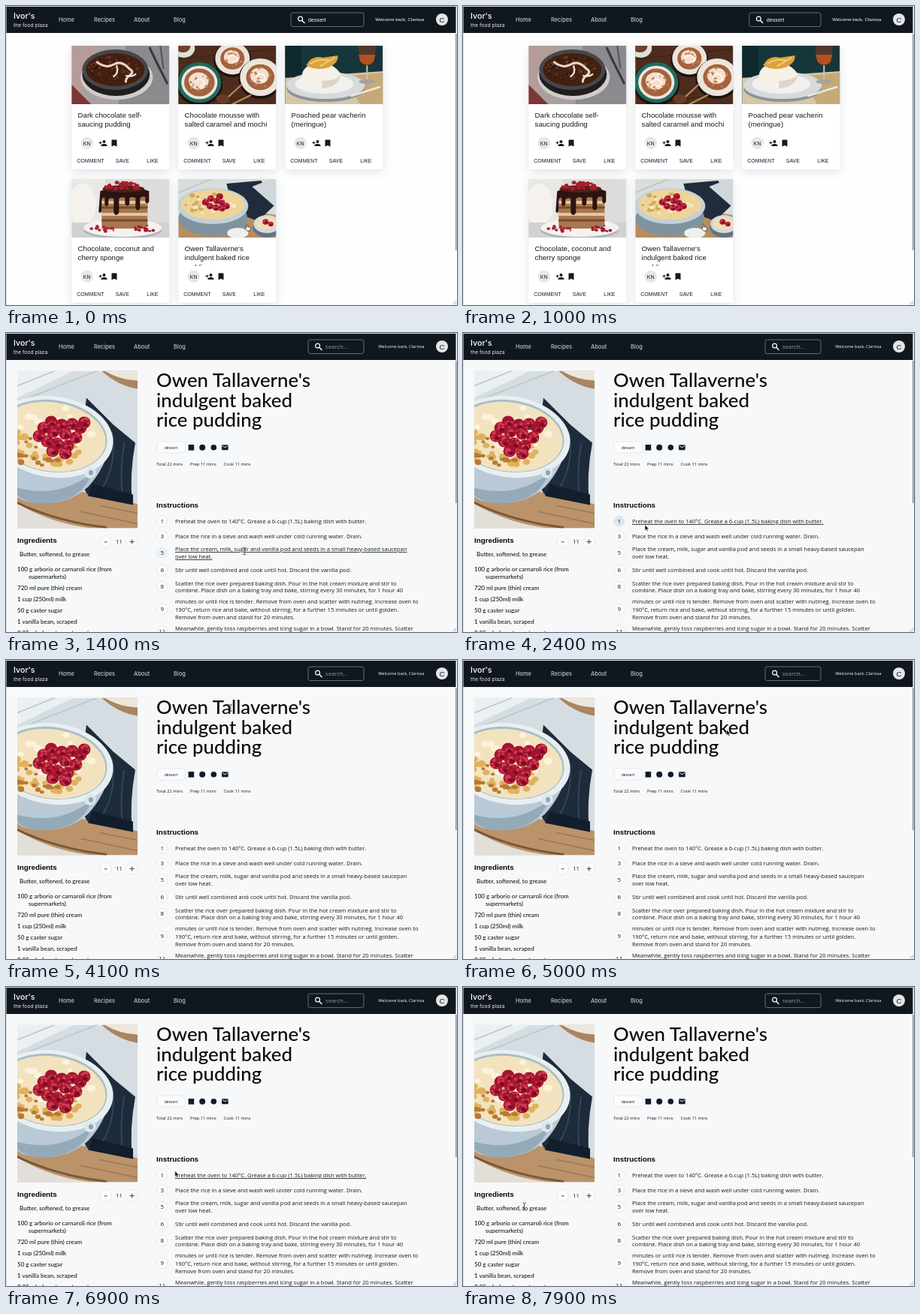
An HTML page that plays this animation: 600 by 399 pixels, repeating every 8000 ms.

```html
<!DOCTYPE html>
<html lang="en">
<head>
<meta charset="utf-8">
<title>Recipe site</title>
<style>
html, body { margin: 0; width: 100%; height: 100%; overflow: hidden; background: #fdfefd; }
svg { display: block; }
#stage { width: 600px; height: 399px; }
.arial { font-family: "Liberation Sans", Arial, sans-serif; }
.inter { font-family: Inter, sans-serif; }
.open { font-family: "Open Sans", "Noto Sans", sans-serif; }
.lato { font-family: Lato, sans-serif; font-weight: 500; }
.bold { font-weight: 700; }
.medium { font-weight: 500; }
.mid { text-anchor: middle; }
.end { text-anchor: end; }
.card { filter: drop-shadow(0 3px 6px rgba(40, 60, 90, .14)); }
.soft { filter: blur(.35px); }
</style>
</head>
<body>
<svg id="stage" viewBox="0 0 600 399" xmlns="http://www.w3.org/2000/svg"></svg>
<script>
const LOOP = 8000, STEP = 100;
const INK = '#16191d', BAR = '#11171e', NAVY = '#101b2d';

// drawing helpers
const text = (x, y, str, size, cls, fill = INK) =>
  `<text x="${x}" y="${y}" font-size="${size}" class="${cls}" fill="${fill}">${str}</text>`;
const oval = (x, y, rx, ry, fill, more = '') =>
  `<ellipse cx="${x}" cy="${y}" rx="${rx}" ry="${ry}" fill="${fill}" ${more}/>`;
const rect = (x, y, w, h, fill, more = '') =>
  `<rect x="${x}" y="${y}" width="${w}" height="${h}" fill="${fill}" ${more}/>`;
const shape = (d, fill, more = '') => `<path d="${d}" fill="${fill}" ${more}/>`;
const line = (d, color, w) =>
  `<path d="${d}" fill="none" stroke="${color}" stroke-width="${w}" stroke-linecap="round" stroke-linejoin="round"/>`;
const group = (id, inner, more = '') => `<g id="${id}" ${more}>${inner}</g>`;

// seeded dots spread over an ellipse
function scatter(n, cx, cy, rx, ry, r, fill, seed) {
  let s = seed, out = '';
  const rnd = () => (s = (s * 16807) % 2147483647) / 2147483647;
  for (let i = 0; i < 5; i++) rnd();
  for (let i = 0; i < n; i++) {
    const a = rnd() * 2 * Math.PI, d = Math.sqrt(rnd()), k = r * (.6 + rnd() * .7);
    out += oval((cx + Math.cos(a) * d * rx).toFixed(1), (cy + Math.sin(a) * d * ry).toFixed(1), k.toFixed(1), (k * .8).toFixed(1), fill);
  }
  return out;
}
const photo = (x, y, w, h, bg, inner) =>
  `<svg x="${x}" y="${y}" width="${w}" height="${h}">${rect(0, 0, w, h, bg)}<g class="soft">${inner}</g></svg>`;

const raspberry = (x, y, r) =>
  oval(x, y, r, r * .95, '#a3142f') + scatter(9, x, y, r * .75, r * .75, r * .24, '#cf3a55', Math.round(x * 91 + y * 7)) +
  oval(x + r * .2, y + r * .35, r * .4, r * .3, '#7d0b22');

// pictures on the cards
const pudding =
  shape('M0 0H36L8 78H0z', '#b59c98') + shape('M72 0H130V78H62z', '#8b8a8e') +
  shape('M0 52L26 78H0z', '#7c3634') + line('M104 3L112 20L127 50', '#3a393c', 3) + line('M118 0L122 30', '#55545a', 2) +
  oval(60, 42, 48, 30, '#d0ccca') + oval(59, 38, 45, 29, '#1f1d1f') + oval(58, 32, 44, 27, '#47464a') +
  oval(58, 32, 39, 22, '#43200f') + scatter(45, 56, 30, 33, 17, 1.6, '#6b3d2a', 17) +
  scatter(22, 56, 30, 33, 17, 1.3, '#2a110b', 71) +
  line('M34 22q12 9 22 3t20 5q8 5 2 9t-6 9', '#e9d6ca', 3) + line('M60 27q3 10-4 14M73 40q8 2 12-2', '#f3e8df', 2.2);

const glassBowl = (x, y, r, plate, seed) =>
  oval(x, y + 2, r + 2, r, '#20120d') + oval(x, y, r, r * .93, plate) + oval(x, y, r * .83, r * .77, '#efe5d9') +
  oval(x, y, r * .7, r * .64, '#a3633f') + oval(x - 1, y - 2, r * .46, r * .4, '#f4dfd0') +
  scatter(16, x, y, r * .55, r * .5, 1.6, '#c98356', seed) + line(`M${x - 6} ${y}q5-8 11-2t-4 7`, '#fff5ea', 2);
const mousse =
  shape('M0 0H130V78H0z', '#4d2c1d') + line('M0 18L130 4M0 46L130 33M20 78L130 62', '#3b2015', 1) +
  oval(7, 3, 15, 13, '#dce0d8') + oval(6, 1, 10, 8, '#6e432b') +
  glassBowl(28, 49, 29, '#1f6b60', 5) + glassBowl(72, 17, 23, '#e7e2da', 31) + glassBowl(109, 42, 27, '#e9e4dc', 47) +
  line('M58 76L84 52M72 78L96 66', '#b78b54', 2.2) + oval(59, 71, 9, 6, '#683d27');

const vacherin =
  rect(0, 0, 130, 78, '#17363a') + shape('M0 0H22V42H0z', '#10292e') + shape('M0 43L130 34V78H0z', '#d5c7a5') +
  shape('M78 41L130 36V78H100z', '#c7a877') +
  oval(54, 57, 52, 18, '#8d9399') + oval(54, 53, 52, 18, '#d6dadd') + oval(52, 51, 39, 13, '#f0f1ef') +
  shape('M22 49Q20 29 36 25Q52 18 66 29Q78 38 75 50Q52 62 22 49z', '#f5f1e7') + shape('M49 57Q72 55 74 39Q66 47 49 47z', '#ddd6c8') +
  shape('M28 26Q36 12 50 16L70 13Q72 22 58 29Q40 34 28 26z', '#dba33c') + line('M34 24Q46 16 59 20M47 27L66 16', '#f0cd75', 2) +
  shape('M97 0H121L118 21Q109 30 100 21z', '#51392c') + shape('M98 12H120L118 21Q109 30 100 21z', '#b3521f') +
  line('M109 27V46', '#c2c5c0', 2) + oval(109, 48, 11, 3, '#a6a49a') + line('M88 67L126 55', '#e8e8e4', 2.4);

const cake =
  rect(0, 0, 130, 78, '#dedcda') + shape('M0 0H45V60H0z', '#eae8e5') + oval(14, 34, 18, 28, '#f5f2ee') +
  shape('M0 58H130V78H0z', '#cfd1d3') + oval(68, 68, 52, 12, '#aeb3b8') + oval(68, 65, 52, 12, '#f4f2f0') +
  rect(40, 14, 61, 52, '#a87850', 'rx="5"') + line('M41 31H100M41 47H100', '#dfc7a5', 4) + line('M41 38H100M41 55H100', '#7c4a2d', 3) +
  shape('M38 16Q69 3 103 16V30q-3 5-5 0V24q-5-2-7 2V39q-3 5-6 0V25q-5-2-8 0V33q-3 5-6 0V25q-5-2-8 1V45q-4 6-7 0V26q-4-2-7 1V34q-3 4-5 0V25q-3-1-4 3V43q-3 4-4 0z', '#2c1410') +
  oval(69, 13, 28, 5, '#4b211a') + scatter(24, 68, 9, 24, 5, 2.7, '#a61c2b', 13) +
  scatter(20, 43, 66, 17, 4, 2, '#b02134', 29) + scatter(16, 98, 66, 14, 4, 2, '#a51c2c', 83);

const bakedRice =
  rect(0, 0, 130, 78, '#d9dddd') + line('M0 18L44 0M0 36L22 26', '#bfc7ca', 2) +
  shape('M0 50Q60 35 130 48V78H0z', '#b98c60') + shape('M64 6L110 2L130 33L106 56L74 44z', '#202c3c') + shape('M98 10L124 0H130V38z', '#cfd7dc') +
  oval(46, 52, 46, 24, '#7e929f') + oval(46, 36, 47, 24, '#c3d0d5') + oval(46, 34, 42, 20, '#edd49a') +
  scatter(20, 35, 33, 29, 15, 3, '#d7a857', 9) + scatter(16, 48, 35, 28, 14, 2.5, '#f8e9c2', 61) +
  [[36, 31], [43, 26], [51, 29], [58, 32], [42, 36], [50, 38], [58, 39], [64, 36], [55, 23]].map(([x, y]) => raspberry(x, y, 4.6)).join('') +
  oval(118, 64, 19, 14, '#5f7482') + oval(118, 60, 18, 12, '#d4d9da') + oval(117, 59, 13, 8, '#efdfb7') +
  raspberry(116, 57, 4) + raspberry(123, 60, 3.5) + oval(79, 72, 14, 7, '#edf0ee');

// the large picture on the recipe page
const hero = photo(15, 50.5, 160, 210, '#d5dde2',
  shape('M0 0H75L0 36z', '#eaf0f2') + line('M0 42L106 0M0 20L50 0', '#b9c6cc', 1.5) +
  shape('M112 0H160V24Q134 20 112 0z', '#a98560') + shape('M116 0H160V13Q136 12 116 0z', '#ede6da') +
  shape('M0 166Q80 150 160 178V210H0z', '#ba936b') + shape('M0 177Q45 204 100 210H0z', '#e2dfd9') +
  line('M0 176Q52 201 118 209', '#795638', 3) + line('M85 188L160 204M110 180L160 190', '#9d7650', 1.5) +
  shape('M92 36L128 72L157 96Q149 139 153 178L94 165Q77 150 92 36z', '#1d2b3b') +
  line('M126 82Q133 123 113 157M142 97Q136 135 140 169', '#33475a', 2) + shape('M100 151L154 165V179L94 167z', '#121e2b') +
  shape('M-28 86Q-22 165 12 174Q62 184 94 155Q116 132 127 91z', '#b9cad6') +
  shape('M-10 153Q50 174 99 137Q85 177 30 177Q0 175-10 153z', '#94aab9') +
  oval(47, 88, 81, 54, '#e9eff1', 'transform="rotate(8 47 88)"') +
  oval(46, 87, 74, 48, '#a9bdc9', 'transform="rotate(8 46 87)"') +
  oval(46, 88, 72, 46, '#f2e3be', 'transform="rotate(8 46 88)"') +
  scatter(34, 35, 102, 51, 28, 5, '#dfb15f', 23) + scatter(20, 26, 108, 40, 21, 3.5, '#b87932', 37) +
  scatter(30, 55, 78, 53, 29, 5, '#fbf3dc', 43) +
  oval(97, 136, 8, 7, '#dce7ec', 'transform="rotate(-28 97 136)"') + oval(98, 136, 3, 3.6, '#8ea5b4') +
  [[45, 68], [59, 72], [35, 76], [73, 71], [84, 76], [48, 81], [64, 84], [29, 87], [78, 89], [40, 94], [53, 97], [67, 100], [89, 69], [47, 107], [64, 110]]
    .map(([x, y]) => raspberry(x, y, 8.4)).join(''));

// icons on a 24 unit grid
const icon = (x, y, d, fill = INK, k = .5) => shape(d, fill, `transform="translate(${x} ${y}) scale(${k})"`);
const ADD_USER = 'M15 12a4 4 0 1 0 0-8 4 4 0 0 0 0 8zM6 10V7H4v3H1v2h3v3h2v-3h3v-2zM15 14c-2.7 0-8 1.3-8 4v2h16v-2c0-2.7-5.3-4-8-4z';
const BOOKMARK = 'M17 3H7c-1.1 0-2 .9-2 2v16l7-3 7 3V5c0-1.1-.9-2-2-2z';
const MAIL = 'M20 4H4a2 2 0 0 0-2 2v12c0 1.1.9 2 2 2h16a2 2 0 0 0 2-2V6a2 2 0 0 0-2-2zm0 4l-8 5-8-5V6l8 5 8-5z';

const chef = "Owen Tallaverne's";
function card(x, y, art, bg, lines) {
  return `<g class="card">${rect(x, y, 130, 165, '#fff', 'rx="3"')}</g>` + photo(x, y, 130, 78, bg, art) +
    `<svg x="${x}" y="${y + 80}" width="130" height="36">` +
    lines.map((s, i) => text(8.3, 15.6 + i * 12.7, s, 9.65, 'arial')).join('') + '</svg>' +
    oval(x + 20.4, y + 130, 8.3, 8.3, '#e6e7e7') + text(x + 20.4, y + 132.5, 'KN', 7, 'arial mid') +
    icon(x + 35.7, y + 124, ADD_USER) + icon(x + 50.7, y + 124, BOOKMARK) +
    [['COMMENT', 7], ['SAVE', 58.5], ['LIKE', 100]].map(([s, dx]) => text(x + dx, y + 156.2, s, 7, 'arial', '#151a31')).join('');
}
const listPage = rect(0, 36, 600, 363, '#fdfefd') +
  card(87.3, 53, pudding, '#aaa0a0', ['Dark chocolate self-', 'saucing pudding']) +
  card(229.3, 53, mousse, '#4d2c1d', ['Chocolate mousse with', 'salted caramel and mochi']) +
  card(371.3, 53, vacherin, '#17363a', ['Poached pear vacherin', '(meringue)']) +
  card(87.3, 231, cake, '#dedcda', ['Chocolate, coconut and', 'cherry sponge']) +
  card(229.3, 231, bakedRice, '#d9dddd', [chef, 'indulgent baked rice', 'pudding']) +
  rect(598, 37, 1.5, 289, '#8d9195');

// recipe page: number, circle centre, first baseline, line gap, lines
const steps = [
  [1, 251, 254, 0, ['Preheat the oven to 140°C. Grease a 6-cup (1.5L) baking dish with butter.']],
  [3, 271, 274, 0, ['Place the rice in a sieve and wash well under cold running water. Drain.']],
  [5, 293.5, 291.3, 10, ['Place the cream, milk, sugar and vanilla pod and seeds in a small heavy-based saucepan', 'over low heat.']],
  [6, 316, 319, 0, ['Stir until well combined and cook until hot. Discard the vanilla pod.']],
  [8, 338.5, 336.6, 9.7, ['Scatter the rice over prepared baking dish. Pour in the hot cream mixture and stir to', 'combine. Place dish on a baking tray and bake, stirring every 30 minutes, for 1 hour 40']],
  [9, 368.5, 361.3, 10.2, ['minutes or until rice is tender. Remove from oven and scatter with nutmeg. Increase oven to', '190°C, return rice and bake, without stirring, for a further 15 minutes or until golden.', 'Remove from oven and stand for 20 minutes.']],
  [11, 398, 396.6, 10, ['Meanwhile, gently toss raspberries and icing sugar in a bowl. Stand for 20 minutes. Scatter']]
];
const ring = 'stroke="#e1e5ea" stroke-width=".8"';
const stepList = steps.map(([n, cy, y, gap, lines]) =>
  oval(207.7, cy, 7.2, 7.2, '#fafbfc', `${ring} id="ring${n}"`) + text(207.7, cy + 2.9, n, 8, 'open mid') +
  group('step' + n, lines.map((s, i) => text(225, y + i * gap, s, 7.56, 'open')).join(''))).join('');

const ingredients = [
  [18, 298, 'Butter, softened, to grease'], [15, 318.2, '100 g arborio or carnaroli rice (from'], [30, 328, 'supermarkets)'],
  [15, 343, '720 ml pure (thin) cream'], [15, 358, '1 cup (250ml) milk'], [15, 373, '50 g caster sugar'],
  [15, 388, '1 vanilla bean, scraped'], [15, 402.6, '0.25 whole nutmeg, to grate']
];
const recipe = hero +
  [chef, 'indulgent baked', 'rice pudding'].map((s, i) => text(200, 72 + i * 26.6, s, 25.8, 'lato', '#090b0e')).join('') +
  rect(200.5, 145, 38, 15, '#fafbfc', `rx="4" ${ring}`) + text(219.5, 154.6, 'dessert', 5.15, 'open mid') +
  rect(242.6, 149, 7.6, 7.6, NAVY) + oval(261.2, 152.8, 4, 4, NAVY) + oval(276.3, 152.8, 3.8, 3.8, NAVY) +
  icon(286.2, 147.6, MAIL, NAVY, .43) +
  [[200, 'Total 22 mins'], [245, 'Prep 11 mins'], [289.6, 'Cook 11 mins']].map(([x, s]) => text(x, 176.6, s, 5.7, 'open')).join('') +
  text(200, 232.6, 'Instructions', 9.8, 'arial bold', '#050607') + text(15, 279.8, 'Ingredients', 9.8, 'arial bold', '#050607') +
  oval(132.7, 278.5, 8, 8, '#fafbfc', ring) + oval(167.7, 278.5, 8, 8, '#fafbfc', ring) +
  line('M131.2 278.8h3M165 278.6h5.4M167.7 275.9v5.4', INK, .8) + text(150.4, 281.3, '11', 7.8, 'open mid') +
  ingredients.map(([x, y, s]) => text(x, y, s, 8.05, 'lato')).join('') + stepList +
  rect(598, 37, 1.5, 190, '#8d9195');

const welcome = 'Welcome back, Clarissa';
const header = rect(0, 0, 600, 1, '#cfd2d4') + rect(0, 1, 598.5, 35, BAR) +
  text(10, 17, "Ivor's", 10.7, 'inter medium', '#fff') + text(10, 28, 'the food plaza', 6.75, 'inter', '#e6e8ea') +
  [['Home', 70], ['Recipes', 117], ['About', 170], ['Blog', 223]].map(([s, x]) => text(x, 20.8, s, 7.4, 'inter medium', '#c3c6c9')).join('') +
  rect(379, 9, 97, 18.5, '#10181f', 'id="box" rx="2.5" stroke="#697981" stroke-width=".9"') +
  group('field',
    `<circle cx="12.6" cy="17" r="2.9" fill="none" stroke="#fff" stroke-width="1.2"/>` + line('M15 19.5l3 3', '#fff', 1.4) +
    group('query', text(23, 20.6, 'dessert', 7.2, 'arial', '#fff')) + group('hint', text(23, 20.6, 'search...', 7.7, 'open', '#8f989e'))) +
  rect(425, 14, 1, 8, '#fff', 'id="caret"') +
  group('greetA', text(556.5, 20.4, welcome, 6.1, 'arial end', '#fff')) +
  group('greetB', text(556.5, 20.4, welcome, 5.67, 'open end', '#fff')) +
  oval(580, 18, 8, 8, '#e4e5e6') + text(580, 21.5, 'C', 9.8, 'arial mid');

const pointers =
  group('hand', shape('M0 .6Q.8-.6 1.5.6V3.4L5 4.2Q6 4.6 5.8 6L5.2 9H1L-2 5.6Q-1.8 4.4 0 5.4z', '#fff', 'stroke="#222" stroke-width=".7"')) +
  group('beam', line('M-1.8-5Q0-5 0-3.8V3.8Q0 5-1.8 5M1.8-5Q0-5 0-3.8M0 3.8Q0 5 1.8 5', '#4b4e52', .9)) +
  group('arrow', shape('M0 0V7.4L1.7 5.9L2.9 8.6L4.1 8L3 5.5H5.3z', '#0b0c0d', 'stroke="#fff" stroke-width=".5"'));

const stage = document.getElementById('stage');
stage.innerHTML = group('list', listPage) + group('recipePage', rect(0, 36, 600, 363, '#f6f8f9') + group('recipe', recipe)) +
  header + rect(0, 0, .6, 399, '#c9cccf') + line('M594.5 398L599 393.5M597 398L599 396', '#8c9094', .7) + group('pointer', pointers);

const el = id => document.getElementById(id);
const show = (id, on) => el(id).setAttribute('visibility', on ? 'inherit' : 'hidden');
const clamp = v => Math.max(0, Math.min(1, v));
const ease = v => v * v * (3 - 2 * v);

// time, x, y, pointer from then on
const path = [
  [0, 319.5, 291, 'hand'], [1100, 319, 291, 'arrow'], [1400, 317, 291, 'beam'], [1800, 317, 291, 'beam'],
  [2300, 242, 256, 'arrow'], [3000, 242, 256, 'arrow'], [3400, 158, 160, 'arrow'], [3900, 299, 64, 'beam'],
  [4200, 299, 64, 'beam'], [4800, 372, 82, 'arrow'], [5700, 203, 170, 'arrow'], [5900, 203, 180, 'arrow'],
  [6300, 203, 180, 'arrow'], [6600, 204, 171, 'arrow'], [6950, 226, 250, 'beam'], [7500, 60, 318, 'arrow'],
  [7700, 33, 304, 'beam'], [7800, 33, 304, 'beam'], [7900, 81.5, 293, 'beam']
];
// step number, start and end of hovering
const hovers = [[5, 1300, 2000], [3, 2000, 2200], [1, 2200, 3200], [1, 6900, 7100]];

function pointerAt(t) {
  let i = path.length - 1;
  while (path[i][0] > t) i--;
  const a = path[i], b = path[i + 1] || a;
  const k = ease(clamp((t - a[0]) / (b[0] - a[0] || 1)));
  return [a[1] + (b[1] - a[1]) * k, a[2] + (b[2] - a[2]) * k, a[3]];
}

function draw(t) {
  const onRecipe = t >= 1100;
  show('list', !onRecipe);
  show('recipePage', onRecipe);
  show('recipe', t >= 1400);
  show('query', !onRecipe);
  show('hint', onRecipe);
  show('greetA', !onRecipe);
  show('greetB', onRecipe);
  show('caret', t >= 100 && t < 600);

  const left = 379 + 23 * ease(clamp((t - 960) / 240));
  el('box').setAttribute('x', left);
  el('box').setAttribute('width', 476 - left);
  el('field').setAttribute('transform', `translate(${left} 0)`);

  for (const [n] of steps) {
    const h = hovers.find(([s, from, to]) => s === n && t >= from && t < to);
    const k = h ? clamp((t - h[1]) / 300) : 0;
    el('ring' + n).setAttribute('fill', `rgb(${250 - 46 * k},${251 - 29 * k},${252 - 12 * k})`);
    el('step' + n).setAttribute('text-decoration', h ? 'underline' : 'none');
  }

  const [x, y, kind] = pointerAt(t);
  el('pointer').setAttribute('transform', `translate(${x.toFixed(1)} ${y.toFixed(1)})`);
  for (const id of ['hand', 'beam', 'arrow']) show(id, id === kind);
}

const start = performance.now();
function tick() {
  const t = (performance.now() - start) % LOOP;
  draw(Math.floor(t / STEP) * STEP);
  requestAnimationFrame(tick);
}
draw(0);
requestAnimationFrame(tick);
</script>
</body>
</html>
```
